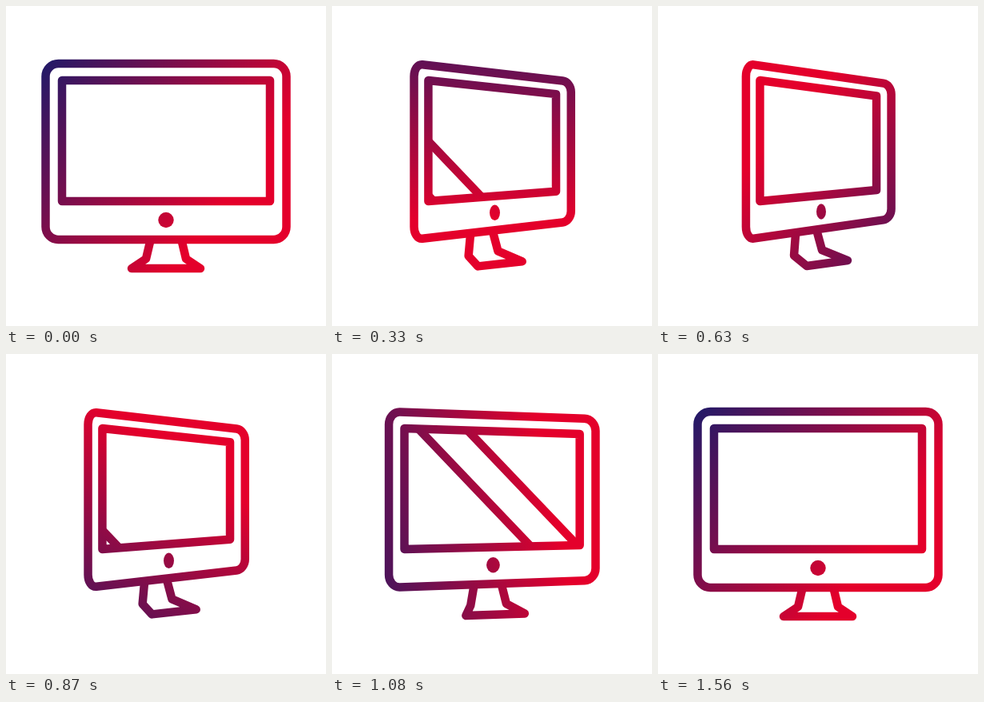
Recreate the animation shown at these times as an HTML page. Size 400 by 400 pixels, loop 2370 ms.

```html
<!DOCTYPE html>
<html lang="en">
<head>
<meta charset="utf-8">
<title>Monitor</title>
<style>
html, body { margin: 0; width: 100%; height: 100%; overflow: hidden; background: #fff; }
svg { display: block; width: 100vw; height: 100vh; }
</style>
</head>
<body>
<svg viewBox="0 0 400 400">
  <defs>
    <linearGradient id="ink" gradientUnits="userSpaceOnUse">
      <stop offset="0" stop-color="#1f1a69"/>
      <stop offset="1" stop-color="#e4002b"/>
    </linearGradient>
    <clipPath id="glass"><path id="pane"/></clipPath>
  </defs>
  <g fill="none" stroke="url(#ink)" stroke-width="10.5" stroke-linejoin="round" stroke-linecap="round">
    <path id="body"/>
    <path id="screen"/>
    <path id="stand"/>
    <path id="glare" clip-path="url(#glass)"/>
    <ellipse id="dot" fill="url(#ink)" stroke="none"/>
  </g>
</svg>
<script>
const LOOP = 2370, STEP = 30, END = 1560, HALF = 600;

const mix = (a, b, p) => a + (b - a) * p;
const toward = (a, b, f) => [mix(a[0], b[0], f), mix(a[1], b[1], f)];
const poly = pts => 'M' + pts.join('L');

function set(id, attrs) {
  const node = document.getElementById(id);
  for (const k in attrs) node.setAttribute(k, attrs[k]);
}

// Cubic-bezier easing, solved by bisection
function bezier(x1, y1, x2, y2) {
  const curve = (a, b, s) => 3 * a * s * (1 - s) ** 2 + 3 * b * s * s * (1 - s) + s ** 3;
  return x => {
    let lo = 0, hi = 1;
    for (let i = 0; i < 30; i++) {
      const mid = (lo + hi) / 2;
      if (curve(x1, x2, mid) < x) lo = mid; else hi = mid;
    }
    return curve(y1, y2, lo);
  };
}

const turnEase = bezier(.25, .15, .18, 1);
const spinEase = bezier(.35, 0, .3, .85);

// 0 facing front, 1 fully turned at HALF, then back again
const turn = t => turnEase(Math.max(0, 1 - Math.abs(t - HALF) / HALF));
const spin = t => (218 + 360 * spinEase(t / END)) * Math.PI / 180;

// The glare leaves to the left while turning and returns on the way back
function sweep(t) {
  if (t < HALF) return 35 + 500 * (1 - t / HALF) ** 2.2;
  return 35 + 500 * Math.sin(Math.max(0, t - 825) / 945 * Math.PI / 2);
}

// Four corners; the right side is shortened by dt above and db below
const quad = (l, r, t, b, dt, db) => [[l, t], [r, t + dt], [r, b - db], [l, b]];

// Corners cut by fractions fx, fy of the sides and rounded
function rounded(pts, fx, fy) {
  const K = .552;
  return pts.map((c, i) => {
    const odd = i % 2;
    const a = toward(c, pts[(i + 3) % 4], odd ? fx : fy);
    const b = toward(c, pts[(i + 1) % 4], odd ? fy : fx);
    return (i ? 'L' : 'M') + a + 'C' + toward(a, c, K) + ' ' + toward(b, c, K) + ' ' + b;
  }).join('') + 'Z';
}

const STAND = [[180, 295], [175, 316], [157, 328], [243, 328], [225, 316], [220, 295]];
const STAND_TURNED = [[172, 285], [170, 312], [186, 325], [237, 318], [205, 305], [199, 283]];

function draw(t) {
  const p = turn(t);
  const body = quad(49.5 + 60.5 * p, 350.5 - 59 * p, 72, 292, 26 * p, 26 * p);
  const screen = poly(quad(70 + 57.5 * p, 330 - 57 * p, 93, 244, 19.5 * p, 14 * p)) + 'Z';
  set('body', { d: rounded(body, .053, .073) });
  set('screen', { d: screen });
  set('pane', { d: screen });
  set('stand', { d: poly(STAND.map((pt, i) => toward(pt, STAND_TURNED[i], p))) });
  set('dot', { cx: 200 + 4 * p, cy: 267.5 - 10.5 * p, rx: 9.7 - 3.7 * p, ry: 9.7 });

  const x = sweep(t);
  const line = m => poly([[m - 105, 60], [m + 105, 280]]);
  set('glare', { d: line(x) + line(x - 56 - 10 * p) });

  const a = spin(t), c = Math.cos(a), s = Math.sin(a);
  const dark = 205 + 30 * p, red = 85 - 20 * p;
  set('ink', { x1: 200 + dark * c, y1: 200 + dark * s, x2: 200 - red * c, y2: 200 - red * s });
}

const start = performance.now();
function tick() {
  const t = (performance.now() - start) % LOOP;
  draw(Math.min(END, Math.floor(t / STEP) * STEP));
  requestAnimationFrame(tick);
}
draw(0);
requestAnimationFrame(tick);
</script>
</body>
</html>
```
